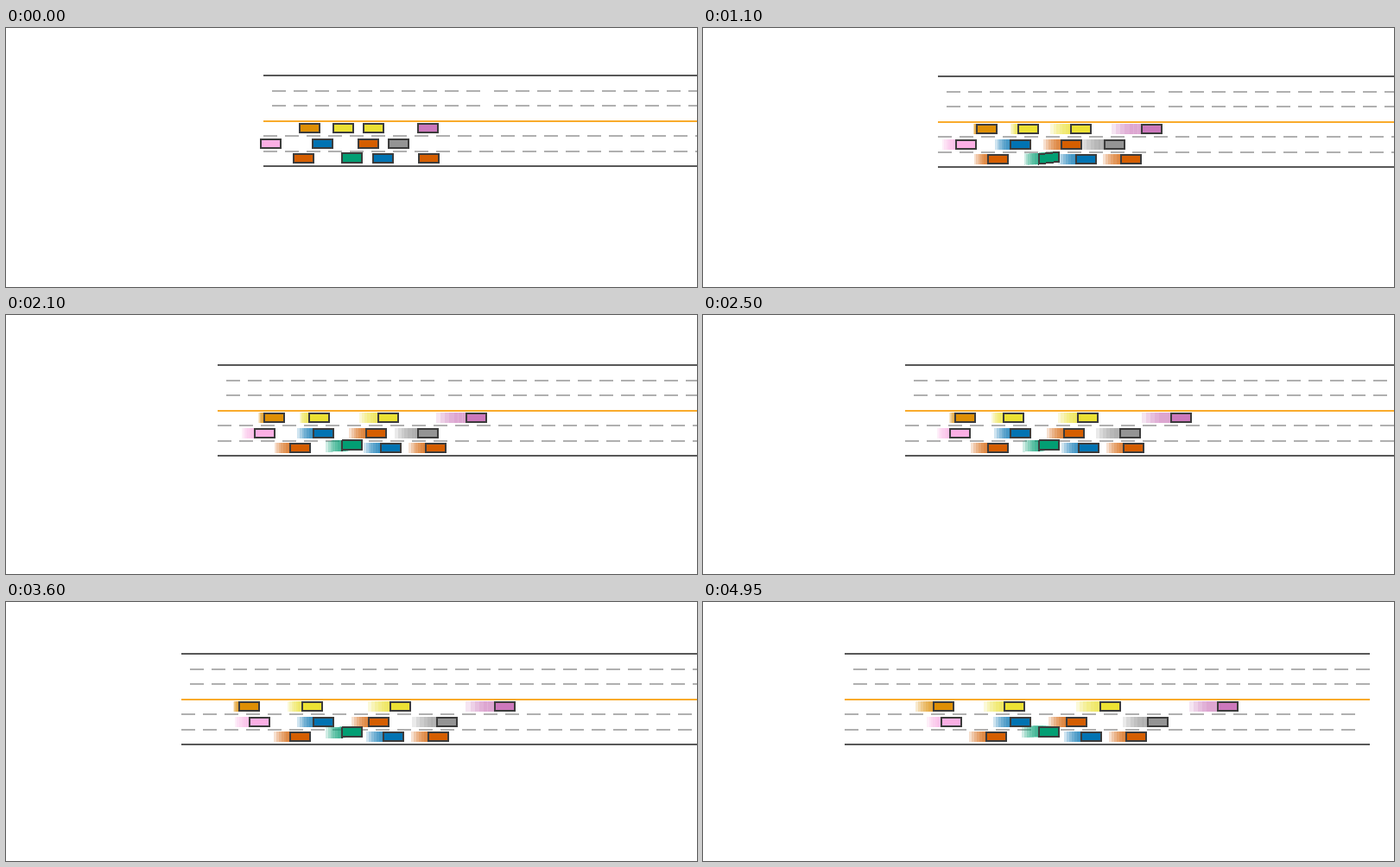
These frames come from a looping animation (800x300 px, 5000 ms). A matplotlib script:

```python
import matplotlib.pyplot as plt
import numpy as np
from matplotlib.animation import FuncAnimation
from matplotlib.collections import PolyCollection
from matplotlib.colors import to_rgba

W, H = 800, 300
FRAMES, INTERVAL = 100, 50
CAR_W, CAR_H, BORDER = 25, 12, 2
ROAD_LEN, DASH, PERIOD = 608, 16, 25
GHOST_AGES = range(13, 0, -2)
GHOST_ALPHA = 0.19

SOLID, DASHED, CENTRE, OUTLINE = "#585858", "#b0b0b0", "#f9ab2c", "#3c3c3c"
ORANGE, YELLOW, MAUVE, PINK = "#de8f05", "#ece133", "#cc78bc", "#fbafe4"
BLUE, RED, GREY, GREEN = "#0173b2", "#d55e00", "#949494", "#029e73"


def smooth(times, values):
    """Cubic Hermite curve through the keys, sampled once per frame."""
    t = np.array(times, float)
    v = np.array(values, float)
    slope = np.gradient(v, t)
    f = np.arange(FRAMES)
    i = np.clip(np.searchsorted(t, f, side="right") - 1, 0, len(t) - 2)
    h = t[i + 1] - t[i]
    s = (f - t[i]) / h
    return ((1 + 2 * s) * (1 - s) ** 2 * v[i] + s * (1 - s) ** 2 * h * slope[i]
            + s * s * (3 - 2 * s) * v[i + 1] + s * s * (s - 1) * h * slope[i + 1])


# Camera: left end of the road, vertical shift of the road, tilt of the ego car
road_x = smooth(range(0, 100, 11), [298, 286, 272, 257, 242, 227, 211, 196, 180, 164])
road_y = np.interp(range(FRAMES),
                   [0, 11, 22, 33, 44, 50, 55, 66, 72, 77, 86, 92, 99],
                   [0, .3, 1, 2, 3, 3.4, 4, 5, 5.2, 5.4, 6, 6, 5.4])
tilt = np.interp(range(FRAMES), [0, 4, 11, 22, 33, 86, 92, 99],
                 [0, 0, 2, 3, 1, 1, 0, 0])

KEYS = [0, 22, 35, 50, 72, 86, 99]
ROWS = [110, 128, 145]
TRAFFIC = [
    (0, ORANGE, [339, 316, 304, 291, 269, 265, 266]),
    (0, YELLOW, [378, 364, 353, 347, 342, 344, 348]),
    (0, YELLOW, [413, 425, 428, 433, 444, 451, 459]),
    (0, MAUVE, [476, 507, 523, 541, 565, 582, 595]),
    (1, PINK, [294, 292, 289, 285, 281, 278, 275]),
    (1, BLUE, [354, 355, 355, 355, 355, 355, 355]),
    (1, RED, [407, 414, 415, 417, 419, 419, 420]),
    (1, GREY, [442, 464, 471, 482, 498, 505, 514]),
    (2, RED, [332, 329, 328, 329, 328, 327, 327]),
    (2, BLUE, [424, 431, 432, 434, 436, 437, 437]),
    (2, RED, [477, 483, 484, 486, 488, 489, 489]),
]
cars = [(ROWS[row], color, smooth(KEYS, xs)) for row, color, xs in TRAFFIC]
EGO_X, EGO_Y = 388, 144.55


def box(x, y, w, h, rise=0.0):
    """Rectangle whose right side is lifted by `rise` pixels."""
    return [(x, y + rise / 2), (x + w, y - rise / 2),
            (x + w, y + h - rise / 2), (x, y + h + rise / 2)]


def road_shapes(n):
    x, y = round(road_x[n]), round(road_y[n])
    shapes = []
    for top, color in ((54, SOLID), (107, CENTRE), (159, SOLID)):
        shapes.append((box(x, top + y, ROAD_LEN, 2), to_rgba(color)))
    upper = [10 + PERIOD * k for k in range(10)] + [267 + PERIOD * k for k in range(14)]
    lower = [PERIOD * k for k in range(24)]
    for top, starts in ((72, upper), (89, upper), (124, lower), (142, lower)):
        for start in starts:
            width = min(DASH, ROAD_LEN - start)
            shapes.append((box(x + start, top + y, width, 2), to_rgba(DASHED)))
    return shapes


def car_shapes(x, y, color, rise=0.0):
    b = BORDER
    inner = rise * (CAR_W - 2 * b) / CAR_W
    return [(box(x, y, CAR_W, CAR_H, rise), to_rgba(OUTLINE)),
            (box(x + b, y + b, CAR_W - 2 * b, CAR_H - 2 * b, inner), to_rgba(color))]


def scene(n):
    trails, bodies = [], []
    past = [n - age for age in GHOST_AGES if n >= age]
    for row, color, xs in cars:
        y = row + round(road_y[n])
        for p in past:
            x = round(xs[p] - road_x[p] + road_x[n])
            trails.append((box(x, y, CAR_W, CAR_H), to_rgba(color, GHOST_ALPHA)))
        bodies += car_shapes(round(xs[n]), y, color)
    for p in past:
        x = round(EGO_X - road_x[p] + road_x[n])
        y = EGO_Y - road_y[p] + road_y[n]
        trails.append((box(x, y, CAR_W, CAR_H, tilt[p]), to_rgba(GREEN, GHOST_ALPHA)))
    bodies += car_shapes(EGO_X, EGO_Y, GREEN, tilt[n])
    return road_shapes(n) + trails + bodies


fig = plt.figure(figsize=(W / 100, H / 100), dpi=100, facecolor="white")
ax = fig.add_axes([0, 0, 1, 1])
ax.set_xlim(0, W)
ax.set_ylim(H, 0)
ax.axis("off")
shapes = PolyCollection([], edgecolors="none", linewidths=0, antialiaseds=False)
shapes.set_snap(False)
ax.add_collection(shapes, autolim=False)


def update(n):
    verts, colors = zip(*scene(n))
    shapes.set_verts(verts)
    shapes.set_facecolor(colors)
    return (shapes,)


anim = FuncAnimation(fig, update, frames=FRAMES, interval=INTERVAL,
                     repeat=True, repeat_delay=0, blit=False)
plt.show()
```
